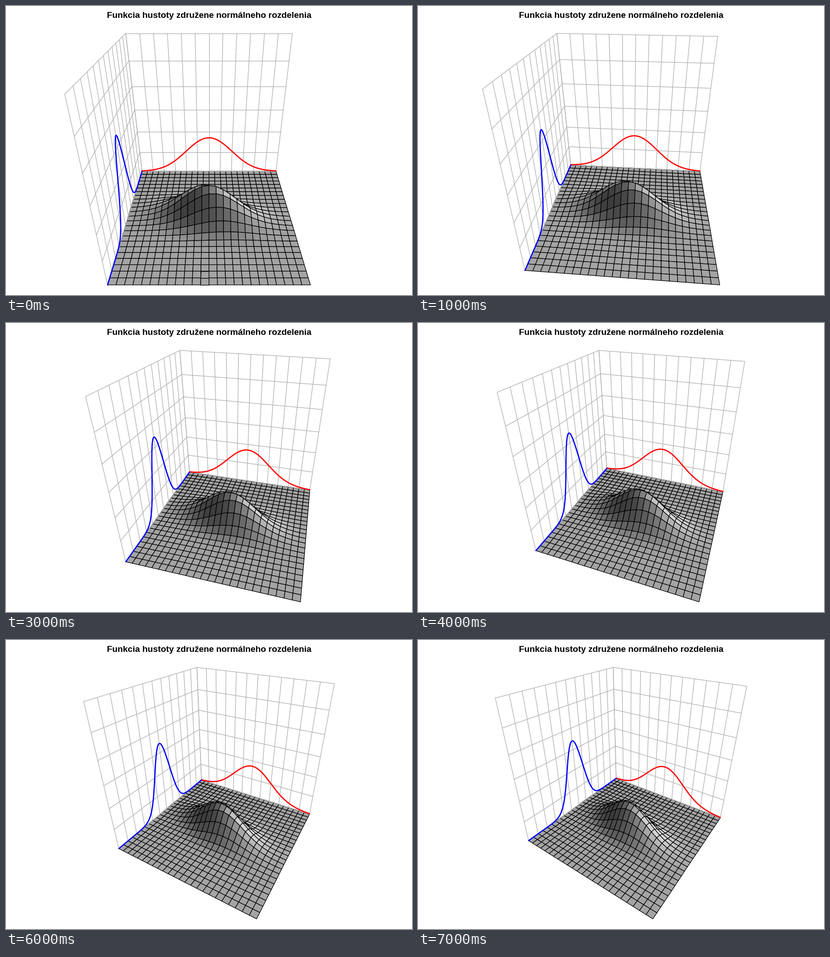
These frames come from a looping animation (885 px wide and 632 px high, 8000 ms). A matplotlib script:

```python
import itertools

import matplotlib.pyplot as plt
import numpy as np
from matplotlib.animation import FuncAnimation
from matplotlib.collections import LineCollection, PolyCollection

W, H, DPI = 885, 632, 128
TOP, BOTTOM = 59.9, 609.9       # vertical span of the projected box
FRAMES, INTERVAL, STEP = 8, 1000, 5
PHI = np.radians(30)
DIST = np.sqrt(3) + 2
LIM, ZMAX = 3, 1.4
SX, SY, RHO = 1, 0.5, -0.3
SHADE = 0.64
CORNERS = np.array(list(itertools.product((-1, 1), repeat=3)), float)


def px(n):
    """Pixels to points."""
    return n * 72 / DPI


def normal(t, sd):
    return np.exp(-0.5 * (t / sd) ** 2) / (sd * np.sqrt(2 * np.pi))


def joint(x, y):
    u, v, k = x / SX, y / SY, 1 - RHO ** 2
    q = (u * u - 2 * RHO * u * v + v * v) / k
    return np.exp(-q / 2) / (2 * np.pi * SX * SY * np.sqrt(k))


def to_box(x, y, z):
    """Data coordinates to the cube from -1 to 1."""
    parts = np.broadcast_arrays(x / LIM, y / LIM, 2 * z / ZMAX - 1)
    return np.stack(parts, axis=-1).astype(float)


def perspective(p, theta):
    x, y, z = p[..., 0], p[..., 1], p[..., 2]
    c, s = np.cos(theta), np.sin(theta)
    across, depth = x * c + y * s, y * c - x * s
    up = z * np.cos(PHI) + depth * np.sin(PHI)
    away = DIST + depth * np.cos(PHI) - z * np.sin(PHI)
    return np.stack([across / away, up / away], axis=-1)


def camera(theta):
    """Projection to the stage, fitted so the cube fills the height."""
    box = perspective(CORNERS, theta)
    low, high = box.min(axis=0), box.max(axis=0)
    scale = (BOTTOM - TOP) / (high[1] - low[1])
    mid = (low[0] + high[0]) / 2

    def project(p):
        q = perspective(p, theta)
        return np.stack([W / 2 + (q[..., 0] - mid) * scale,
                         TOP + (high[1] - q[..., 1]) * scale], axis=-1)
    return project


# Surface facets and their shades, lit from the back right
ticks = np.linspace(-LIM, LIM, 25)
gx, gy = np.meshgrid(ticks, ticks, indexing="ij")
mesh = to_box(gx, gy, joint(gx, gy))
p00, p10 = mesh[:-1, :-1], mesh[1:, :-1]
p11, p01 = mesh[1:, 1:], mesh[:-1, 1:]
facets = np.stack([p00, p10, p11, p01], axis=2).reshape(-1, 4, 3)
normals = np.cross(p10 - p01, p11 - p00).reshape(-1, 3)
normals /= np.linalg.norm(normals, axis=1, keepdims=True)
light = np.array([1, 1, 0]) / np.sqrt(2)
gray = ((normals @ light + 1) / 2) ** SHADE
colors = np.repeat(gray[:, None], 3, axis=1)
centers = facets.mean(axis=1)

# Wall grids
walls = []
for t in np.linspace(-1, 1, 13):
    walls += [[(t, 1, -1), (t, 1, 1)], [(-1, t, -1), (-1, t, 1)]]
for z in np.linspace(-1, 1, 7):
    walls += [[(-1, 1, z), (1, 1, z)], [(-1, -1, z), (-1, 1, z)]]
walls = np.array(walls, float)

# Marginal densities on the walls
t = np.linspace(-LIM, LIM, 241)
red_path = to_box(t, LIM, normal(t, SX))
blue_path = to_box(-LIM, t, normal(t, SY))

fig = plt.figure(figsize=(W / DPI, H / DPI), dpi=DPI, facecolor="white")
ax = fig.add_axes([0, 0, 1, 1])
ax.set_xlim(0, W)
ax.set_ylim(H, 0)
ax.axis("off")

surface = PolyCollection([], edgecolors="black", linewidths=px(1.32),
                         joinstyle="round", zorder=1)
grid = LineCollection([], colors="#b0b0b0", linewidths=px(1.32),
                      capstyle="round", zorder=2)
ax.add_collection(surface, autolim=False)
ax.add_collection(grid, autolim=False)
curve = dict(lw=px(2.64), solid_capstyle="round", solid_joinstyle="round")
red, = ax.plot([], [], color="#ff0000", zorder=3, **curve)
blue, = ax.plot([], [], color="#0000ff", zorder=4, **curve)
ax.text(W / 2, 26.5, "Funkcia hustoty združene normálneho rozdelenia",
        family="Liberation Sans", weight="bold", size=px(19),
        ha="center", va="baseline")


def draw(i):
    theta = np.radians(STEP * i)
    project = camera(theta)
    depth = centers[:, 1] * np.cos(theta) - centers[:, 0] * np.sin(theta)
    order = np.argsort(-depth, kind="stable")
    surface.set_verts(project(facets[order]))
    surface.set_facecolor(colors[order])
    grid.set_segments(project(walls))
    red.set_data(*project(red_path).T)
    blue.set_data(*project(blue_path).T)
    return surface, grid, red, blue


anim = FuncAnimation(fig, draw, frames=FRAMES, interval=INTERVAL,
                     repeat=True, repeat_delay=0)
plt.show()
```
